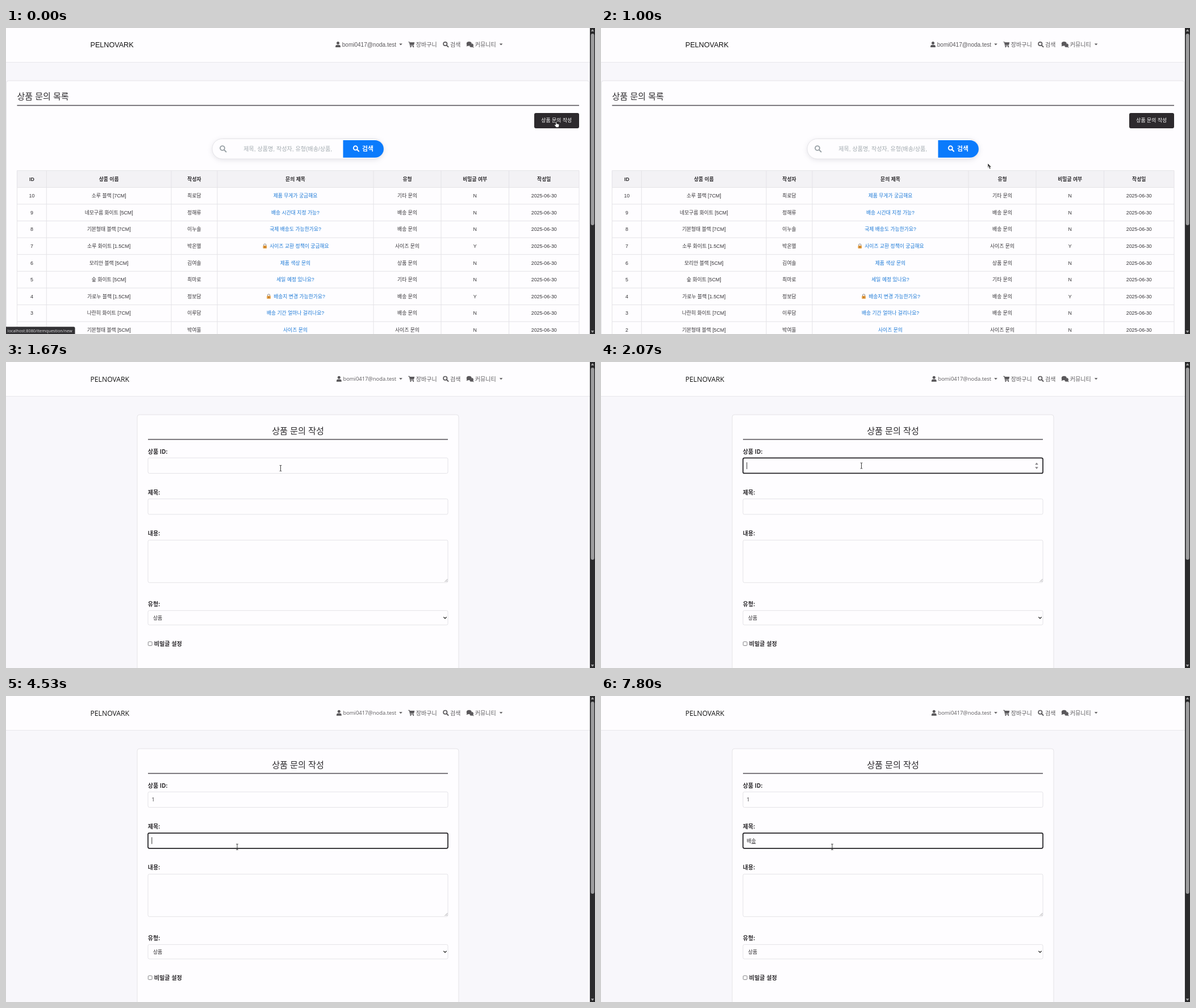
Animation, 1037 px wide and 540 px high, one loop 8000 ms. Source, as an HTML page:

```html
<!DOCTYPE html>
<html lang="ko">
<head>
<meta charset="utf-8">
<title>상품 문의</title>
<style>
  html, body { margin: 0; width: 100%; height: 100%; overflow: hidden; background: #f8f7fb; }
  svg { display: block; width: 100vw; height: 100vh; }
  text { white-space: pre; }
  .arial { font-family: "Liberation Sans", "Noto Sans CJK KR", "Noto Sans CJK", sans-serif; }
  .humanist { font-family: "Open Sans", "Noto Sans CJK KR", "Noto Sans CJK", sans-serif; }
  .pill { filter: drop-shadow(0 2px 4px rgba(60, 60, 80, .12)); }
</style>
</head>
<body>
<svg id="stage" viewBox="0 0 1037 540"></svg>
<script>
const LOOP = 8000, STEP = 1000 / 15;
const PAPER = '#fefdff', LINE = '#e4e3e7', INK = '#2c2a2d', NAV = '#5a585b';
const stage = document.getElementById('stage');

const rect = (x, y, w, h, fill, more = '') =>
  `<rect x="${x}" y="${y}" width="${w}" height="${h}" fill="${fill}" ${more}/>`;
const path = (d, fill, more = '') => `<path d="${d}" fill="${fill}" ${more}/>`;
const stroke = (d, color, width, more = '') =>
  path(d, 'none', `stroke="${color}" stroke-width="${width}" ${more}`);
// y is the vertical middle of the glyphs
const label = (x, y, size, str, fill = INK, more = '') =>
  `<text x="${x}" y="${(y + size * .365).toFixed(2)}" font-size="${size}" fill="${fill}" ${more}>${str}</text>`;
const MID = 'text-anchor="middle"', BOLD = 'font-weight="700"', MEDIUM = 'font-weight="500"';

const lens = (x, y, r, w, color) =>
  `<circle cx="${x}" cy="${y}" r="${r}" fill="none" stroke="${color}" stroke-width="${w}"/>` +
  stroke(`M${x + r * .8} ${y + r * .8}l${r * .85} ${r * .85}`, color, w * 1.1, 'stroke-linecap="round"');
const down = (x, y) => path(`M${x - 2.8} ${y - 1.4}h5.6l-2.8 2.9z`, NAV);

function nav(dy, brandSize, mailSize, userX) {
  return rect(0, 0, 1028, 60.5, PAPER) + rect(0, 60, 1028, 1, '#e9e8ec') +
    `<g transform="translate(0 ${dy})">` +
    label(148.5, 29.6, brandSize, 'PELNOVARK', '#111') +
    `<circle cx="${userX}" cy="26.6" r="2.5" fill="${NAV}"/>` +
    path(`M${userX - 4.4} 34v-1.2q0-3 3-3h2.8q3 0 3 3v1.2z`, NAV) +
    label(687, 29.2, mailSize, 'bomi0417@noda.test', NAV, 'text-anchor="end"') +
    down(695, 29) +
    path('M710.5 25.2h8.8l-1.2 4.9h-6.5z', NAV) +
    stroke('M708.4 24.7h1.8l1.6 6.7h6.2', NAV, 1.1) +
    `<circle cx="712.4" cy="33.2" r="1.1" fill="${NAV}"/><circle cx="717.2" cy="33.2" r="1.1" fill="${NAV}"/>` +
    label(721.8, 29.2, 10, '장바구니', NAV) +
    lens(773.3, 28, 3.2, 1.7, NAV) +
    label(782, 29.2, 10, '검색', NAV) +
    `<ellipse cx="815.3" cy="27.7" rx="4.5" ry="3.7" fill="${NAV}"/>` + path('M811.6 29l-.9 3.6 4-1.6z', NAV) +
    stroke('M820.6 27.4a3.6 3.3 0 0 1 1.6 5l1.4 2-2.8-.8a4 3.4 0 0 1-4.6-1.4', NAV, .4, `style="fill:${NAV}"`) +
    label(825.8, 29.2, 10, '커뮤니티', NAV) + down(871.6, 29) + '</g>';
}

const scrollbar = end => rect(1028, 0, 9, 540, '#2b2b2c') +
  rect(1029.7, 10, 6, end - 10, '#9d9d9e', 'rx="3"') +
  path('M1029.8 6l2.8-4 2.8 4zM1029.8 534l2.8 4 2.8-4z', '#a3a3a4');

const lock = (x, y) =>
  stroke(`M${x - 2} ${y}v-1.8a2 2 0 0 1 4 0v1.8`, '#96908e', 1.1) +
  rect(x - 3.3, y - .8, 6.6, 5, '#e39a3c', 'rx=".9"') + rect(x - .5, y + .8, 1, 1.8, '#6a4422');

const edges = [19.5, 71.3, 291, 372, 647, 766, 885.5, 1009];
const centers = edges.slice(1).map((e, i) => (e + edges[i]) / 2);
const heads = ['ID', '상품 이름', '작성자', '문의 제목', '유형', '비밀글 여부', '작성일'];
const rows = [
  '소루 블랙 [7CM]|최로담|제품 무게가 궁금해요|기타',
  '네모구름 화이트 [5CM]|정해류|배송 시간대 지정 가능?|배송',
  '기본형태 블랙 [7CM]|이누솔|국제 배송도 가능한가요?|배송',
  '소루 화이트 [1.5CM]|박온별|사이즈 교환 정책이 궁금해요|사이즈|455.8',
  '모리안 블랙 [5CM]|김여솔|제품 색상 문의|상품',
  '숲 화이트 [5CM]|최마로|세일 예정 있나요?|기타',
  '가로누 블랙 [1.5CM]|정보담|배송지 변경 가능한가요?|배송|462.6',
  '나란히 화이트 [7CM]|이루담|배송 기간 얼마나 걸리나요?|배송',
  '기본형태 블랙 [5CM]|박여울|사이즈 문의|사이즈'
].map(r => r.split('|'));

function table() {
  const top = 251.7, head = 29.6, pitch = 29.6;
  let out = rect(19.5, top, 989.5, head, '#f3f2f5');
  heads.forEach((h, i) => out += label(centers[i], 266.5, 8.8, h, INK, `${MID} ${BOLD}`));
  rows.forEach(([item, who, title, kind, lockX], i) => {
    const y = 296 + pitch * i;
    const cells = [10 - i, item, who, title, kind + ' 문의', lockX ? 'Y' : 'N', '2025-06-30'];
    cells.forEach((c, k) => out += label(centers[k] + (k === 3 && lockX ? 7 : 0), y, 8.8, c,
      k === 3 ? '#1a78d6' : '#343236', MID));
    if (lockX) out += lock(+lockX, y);
  });
  let grid = edges.map(x => `M${x} ${top}V540`).join('');
  for (let y = top; y < 540; y += pitch) grid += `M19.5 ${y.toFixed(1)}H1009`;
  return out + stroke(grid, LINE, 1);
}

const listPage = `<g id="list" class="arial">` +
  nav(0, 12.6, 10, 584.5) +
  rect(.5, 93, 1026.5, 460, PAPER, `rx="4" stroke="${LINE}"`) +
  label(19.5, 120.3, 15, '상품 문의 목록', INK, MEDIUM) +
  rect(19.5, 135.8, 989.5, 1.6, '#57545a') +
  rect(930, 150, 79, 27, '#2d2a2d', 'rx="3"') +
  label(969.3, 163, 8.9, '상품 문의 작성', '#fff', MID) +
  rect(363, 195.5, 302, 35.5, PAPER, `rx="17.7" stroke="${LINE}" class="pill"`) +
  lens(381, 212, 3.9, 1.9, '#99a1a6') +
  '<clipPath id="field"><rect x="415" y="198" width="159" height="31"/></clipPath>' +
  label(418.3, 213.3, 10.1, '제목, 상품명, 작성자, 유형(배송/상품, 제목', '#a3abb0', 'clip-path="url(#field)"') +
  path('M593.5 198H649.5a15.4 15.4 0 0 1 0 30.8H593.5z', '#0b7bfc') +
  lens(615.3, 211.8, 3.5, 1.9, '#fff') +
  label(627, 213.2, 10.8, '검색', '#fff', BOLD) +
  table() + scrollbar(348) +
  '<g id="status">' + path('M0 527.3H119q2.5 0 2.5 2.5V540H0z', '#333235') +
  label(2.8, 534, 7.3, 'localhost:8080/itemquestion/new', '#e2e1e3', 'class="humanist"') + '</g></g>';

const box = (y, h, id = '') => rect(250, y, 528, h, PAPER, `rx="2.5" stroke="${LINE}" ${id}`);
const formPage = `<g id="form" class="humanist">` +
  nav(.7, 12.2, 9.4, 586.3) +
  rect(231, 93, 566, 460, PAPER, `rx="4" stroke="${LINE}"`) +
  label(514, 121.3, 15.2, '상품 문의 작성', INK, `${MID} ${MEDIUM}`) +
  rect(250, 135.8, 528, 1.6, '#57545a') +
  [['상품 ID:', 158], ['제목:', 230.3], ['내용:', 302.6], ['유형:', 427.3]]
    .map(([s, y]) => label(249.8, y, 10, s, INK, BOLD)).join('') +
  box(169.2, 27.3) + box(241.6, 27.3) + box(314.3, 75) + box(438.6, 25.4) +
  stroke('M772.5 388l5-5M775.3 388l2.2-2.2', '#8b898d', .8) +
  label(259, 451.4, 8.8, '상품') +
  stroke('M770.4 450l2.6 2.6 2.6-2.6', '#2a2a2a', 1.3) +
  rect(250.3, 493.7, 6.8, 6.8, '#fff', 'rx="1.2" stroke="#77757a" stroke-width=".9"') +
  label(260.8, 497.5, 10.1, '비밀글 설정', INK, BOLD) +
  rect(250, 169.4, 528, 27, 'none', 'id="ring" rx="2.5" stroke="#222024" stroke-width="1.7"') +
  path('M764.2 181.3l2.8-3.8 2.8 3.8zM764.2 185.3l2.8 3.8 2.8-3.8z', '#858387', 'id="spin"') +
  label(256.6, 183, 8.8, '', INK, 'id="itemId"') +
  label(256.6, 255.3, 8.8, '', INK, 'id="subject"') +
  rect(0, 260.2, 0, .8, '#333', 'id="under"') +
  rect(0, 0, 1, 12, '#333', 'id="caret"') +
  scrollbar(349) + '</g>';

const cursors =
  path('M-1.2 1V-4.2q0-.9 .9-.9t.9 .9V-1.2l3.4 .8q1 .3 1 1.4l-.5 2.6-.8 1.8H-.3L-3.4 1.6q-.5-1 .5-1.2z',
    '#fff', 'id="hand" stroke="#111" stroke-width=".7" stroke-linejoin="round"') +
  path('M0-4V4.6L2-.1 2 2.7 3.4 5.8 4.9 5.1 3.6 2.2H6.1z', '#111',
    'id="arrow" stroke="#fff" stroke-width=".5"') +
  stroke('M-1.8-5h1.1q.7 0 .7 .7V4.3q0 .7-.7 .7h-1.1M1.8-5H.7q-.7 0-.7 .7M1.8 5H.7q-.7 0-.7-.7',
    '#222', .9, 'id="beam"');

stage.innerHTML = rect(0, 0, 1037, 540, '#f8f7fb') + listPage + formPage + `<g id="cursor">${cursors}</g>`;
const $ = id => document.getElementById(id);
const show = (id, on) => $(id).setAttribute('visibility', on ? 'inherit' : 'hidden');
const set = (id, attrs) => Object.entries(attrs).forEach(([k, v]) => $(id).setAttribute(k, v));

// time, x, y of the pointer
const track = [[0, 969, 170], [530, 800, 236], [800, 800, 236], [1000, 681, 243], [1600, 498, 189],
  [1730, 470, 186], [1870, 470, 186], [2070, 458.5, 183], [2670, 458.5, 183],
  [3470, 408.5, 269], [3530, 408, 268], [3670, 407, 266.3]];
const focusAt = [[0, ''], [1930, 'id'], [3670, 'subject']];
const caretAt = [[0, 0], [1930, 1], [2670, 0], [3070, 1], [3470, 0], [3670, 1], [4130, 0],
  [4530, 1], [6530, 0], [7400, 1], [7800, 0]];
const subjectAt = [[0, ''], [4800, 'q'], [4870, 'qo'], [5400, 'q'], [5600, ''], [5730, 'ㅂ'],
  [5930, '배'], [6130, '뱃'], [6200, '배소'], [6400, '배송']];
const pointerAt = [[0, 'hand'], [130, 'arrow'], [1400, 'beam']];
const at = (list, t) => list.filter(e => e[0] <= t).pop()[1];

function pointer(t) {
  const i = track.findIndex(p => p[0] > t);
  if (i < 0) return track[track.length - 1].slice(1);
  const a = track[i - 1], b = track[i], k = (t - a[0]) / (b[0] - a[0]);
  const e = k * k * (3 - 2 * k);
  return [a[1] + (b[1] - a[1]) * e, a[2] + (b[2] - a[2]) * e];
}

function draw(t) {
  const onForm = t >= 1670;
  show('list', !onForm);
  show('form', onForm);
  show('status', t < 470);

  const focus = at(focusAt, t), first = focus === 'id';
  show('ring', onForm && focus);
  show('spin', onForm && first);
  set('ring', { y: first ? 169.4 : 241.8 });

  const subject = at(subjectAt, t);
  $('itemId').textContent = t >= 2330 ? '1' : '';
  $('subject').textContent = subject;
  const end = 256.6 + (focus ? $(first ? 'itemId' : 'subject').getComputedTextLength() : 0);
  show('caret', onForm && at(caretAt, t));
  set('caret', { x: end - .3, y: first ? 177 : 249.2 });
  show('under', onForm && /[ㄱ-힣]$/.test(subject));
  set('under', { x: end - 8, width: 7.8 });

  const [x, y] = pointer(Math.floor((t + 3.4) / STEP) * STEP);
  set('cursor', { transform: `translate(${x.toFixed(2)} ${y.toFixed(2)})` });
  ['hand', 'arrow', 'beam'].forEach(id => show(id, id === at(pointerAt, t)));
}

const start = performance.now();
function tick() {
  draw((performance.now() - start) % LOOP);
  requestAnimationFrame(tick);
}
tick();
</script>
</body>
</html>
```
